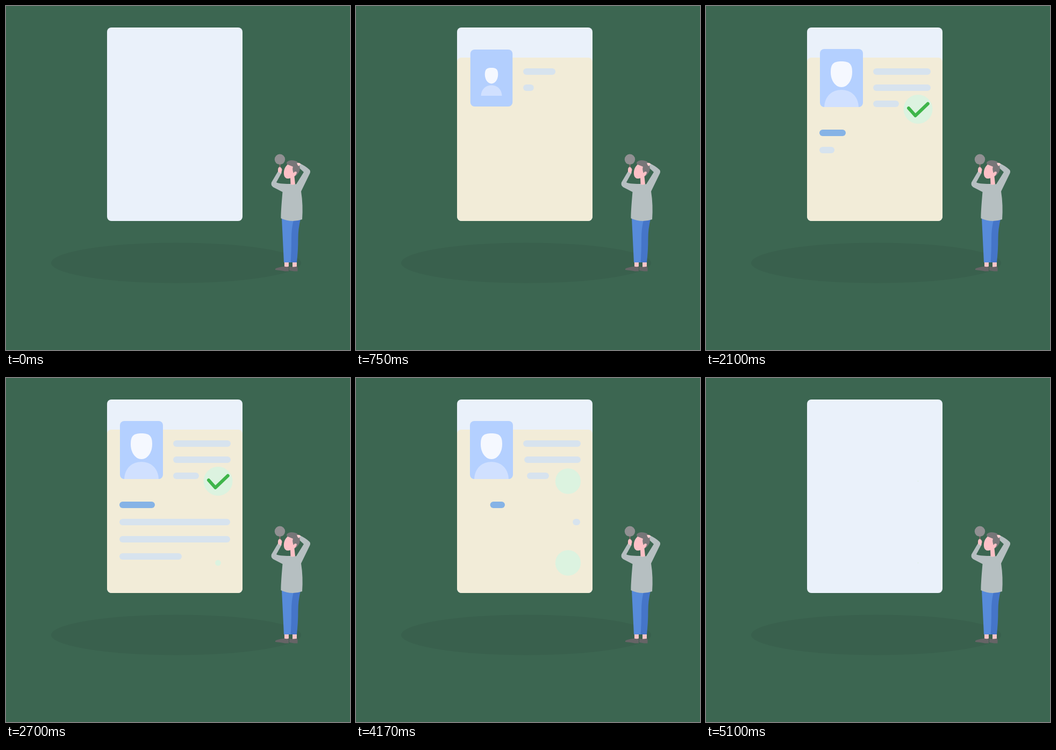
An HTML page with a canvas that plays this animation: 640x640 px, repeating every 5.43 s.

```html
<!DOCTYPE html>
<html lang="en">
<head>
<meta charset="utf-8">
<title>Profile card</title>
<style>
  html, body { margin: 0; height: 100%; overflow: hidden; background: #3c6651; }
  canvas { display: block; }
</style>
</head>
<body>
<canvas id="stage" width="640" height="640"></canvas>
<script>
const ctx = document.getElementById('stage').getContext('2d');
const LOOP = 5430, TICK = 30;

const FIGURE = [
  ['#4575c8', 'M532 396L548 396Q543.500 415 543.500 432Q543.500 456 541 477H529Q528 430 532 396Z'],
  ['#578bdb', 'M513 394L535 398Q531 415 531 432Q531 456 529.500 477H517Z'],
  ['#fbc5ca', 'M518 477H526V486H518ZM533 477H541V486H533Z'],
  ['#666466', 'M501 489Q503 486.500 518 484.500Q522 486 526 484.500V493.500H519Q510 491.500 501 491Z'],
  ['#666466', 'M527 485Q535 486 542 484.500Q543 489 542.500 493.500H536L527 492Z'],
  ['#8f6a6a', 'M508.700 294H510.500V303H508.700Z'],
  ['#b6bfc1', 'M507 306L513 310L503 328Q506 331 528 331L540 331.500L554 309L541 297L546 292.500Q558 298 564.500 304.500Q567 307 565.500 311L549 345Q553 370 551 397Q531 404 511.500 395Q511 386 514.500 346L497 337Q492 333 494 328Z'],
  ['#fcc0c6', 'M506 305Q506 300 509 299.500Q513 300 513.500 305Q513 309 511 312L506 308Z'],
  ['#777678', 'M522 291Q528 284 541 289Q549 296 546 307Q542 315 537 317L532 303L523 296Z'],
  ['#fcc0c6', 'M524 295C517 300 515.500 311 518 317C520 321.500 526 322 529 320L529.500 332Q534 333 538 331.500L536.500 317Q541 313 541 309Q537 306 535 311Q532 303 534 299Z'],
  ['#fbd0d2', 'M541 292.500Q545 290.500 548.500 294L544.500 298Q542 296 541 292.500Z']
].map(([color, d]) => [color, new Path2D(d)]);

const FACE = new Path2D('M252 103C266 103 272 107 272 123C272 139 263 151 252 151C241 151 232 139 232 123C232 107 238 103 252 103Z');
const SHOULDERS = new Path2D('M220 188C221 167 235 156 252 156C269 156 283 167 284 188Z');

// left, right, y, start in, start out, colour
const BARS = [
  [317, 412, 122, 20, 141], [317, 412, 152, 23, 138], [317, 353, 182, 26, 136],
  [217, 271, 236, 64, 133, '#86b3e6'],
  [217, 411, 268, 68, 130], [217, 411, 300, 72, 128], [217, 321, 332, 76, 126]
];

const ramp = (t, from, to) => {
  const p = Math.min(1, Math.max(0, (t - from) / (to - from)));
  return p < .5 ? 2 * p * p : 1 - 2 * (1 - p) ** 2;
};
const mix = (a, b, p) => a + (b - a) * p;

function box(x, y, w, h, r, color) {
  ctx.fillStyle = color;
  ctx.beginPath();
  ctx.roundRect(x, y, w, h, r);
  ctx.fill();
}

function ellipse(x, y, rx, ry, color) {
  ctx.fillStyle = color;
  ctx.beginPath();
  ctx.ellipse(x, y, rx, ry, 0, 0, 2 * Math.PI);
  ctx.fill();
}

function fillPath(path, color) {
  ctx.fillStyle = color;
  ctx.fill(path);
}

function scaleAbout(x, y, s) {
  ctx.translate(x, y);
  ctx.scale(s, s);
  ctx.translate(-x, -y);
}

function panel(t) {
  const shown = ramp(t, 0, 12.3) - ramp(t, 151, 170);
  if (shown <= 0) return;
  const grow = ramp(t, 12, 18) - ramp(t, 146, 151.5);
  ctx.save();
  ctx.beginPath();
  ctx.roundRect(188, 40, 252, 360, 8);
  ctx.clip();
  ctx.translate(0, 285 * (1 - shown));
  scaleAbout(314, 400, mix(.932, 1, grow));
  box(188, 96, 252, 304, 8, '#f2ecd8');
  ctx.restore();
}

function photo(t) {
  const size = ramp(t, 16, 26) - ramp(t, 144.6, 154.6);
  if (size <= 0) return;
  const w = 80 * size, h = 108 * size;
  const color = `rgb(${mix(112, 180, size)} ${mix(140, 208, size)} ${mix(215, 255, size)})`;
  box(252 - w / 2, 134 - h / 2, w, h, Math.min(8, w / 2), color);
  ctx.save();
  scaleAbout(252, 134, ramp(t, 20, 29) - ramp(t, 141, 150.8));
  fillPath(FACE, '#f5f8ff');
  fillPath(SHOULDERS, '#d0e0ff');
  ctx.restore();
}

function bar(t, [left, right, y, start, end, color = '#d7e3ee']) {
  if (t <= start || t >= end + 9.7) return;
  ctx.strokeStyle = color;
  ctx.lineWidth = 12;
  ctx.beginPath();
  ctx.moveTo(mix(left, right, ramp(t, end, end + 9.7)), y);
  ctx.lineTo(mix(left, right, ramp(t, start, start + 10)), y);
  ctx.stroke();
}

function check(t, y, start) {
  if (t <= start) return;
  const pop = 1.1 * ramp(t, start, start + 10) - .1 * ramp(t, start + 10, start + 15);
  ctx.save();
  scaleAbout(394.5, y, pop * mix(1, .03, ramp(t, 134, 154)));
  ellipse(394.5, y, 27, 27, '#dcf3e0');
  const drawn = 51 * (ramp(t, start + 6.8, start + 18) - ramp(t, 124, 136));
  if (drawn > 0) {
    ctx.strokeStyle = '#3fb54a';
    ctx.lineWidth = 6;
    ctx.setLineDash([drawn, 100]);
    ctx.beginPath();
    ctx.moveTo(377, y - 2);
    ctx.lineTo(389.5, y + 12);
    ctx.lineTo(413, y - 10.5);
    ctx.stroke();
  }
  ctx.restore();
}

function draw(now) {
  const t = (now % LOOP) / TICK;
  ctx.lineCap = ctx.lineJoin = 'round';
  ctx.fillStyle = '#3c6651';
  ctx.fillRect(0, 0, 640, 640);
  ellipse(316.5, 478, 232.5, 37.5, '#39604d');
  box(188, 40, 252, 360, 8, '#eaf1fa');
  panel(t);
  photo(t);
  BARS.forEach(b => bar(t, b));
  check(t, 192, 36);
  check(t, 344, 87);
  FIGURE.forEach(([color, path]) => fillPath(path, color));
  ellipse(509.5, 285.3, 9.7, 9.7, '#919092');
  requestAnimationFrame(draw);
}
requestAnimationFrame(draw);
</script>
</body>
</html>
```
